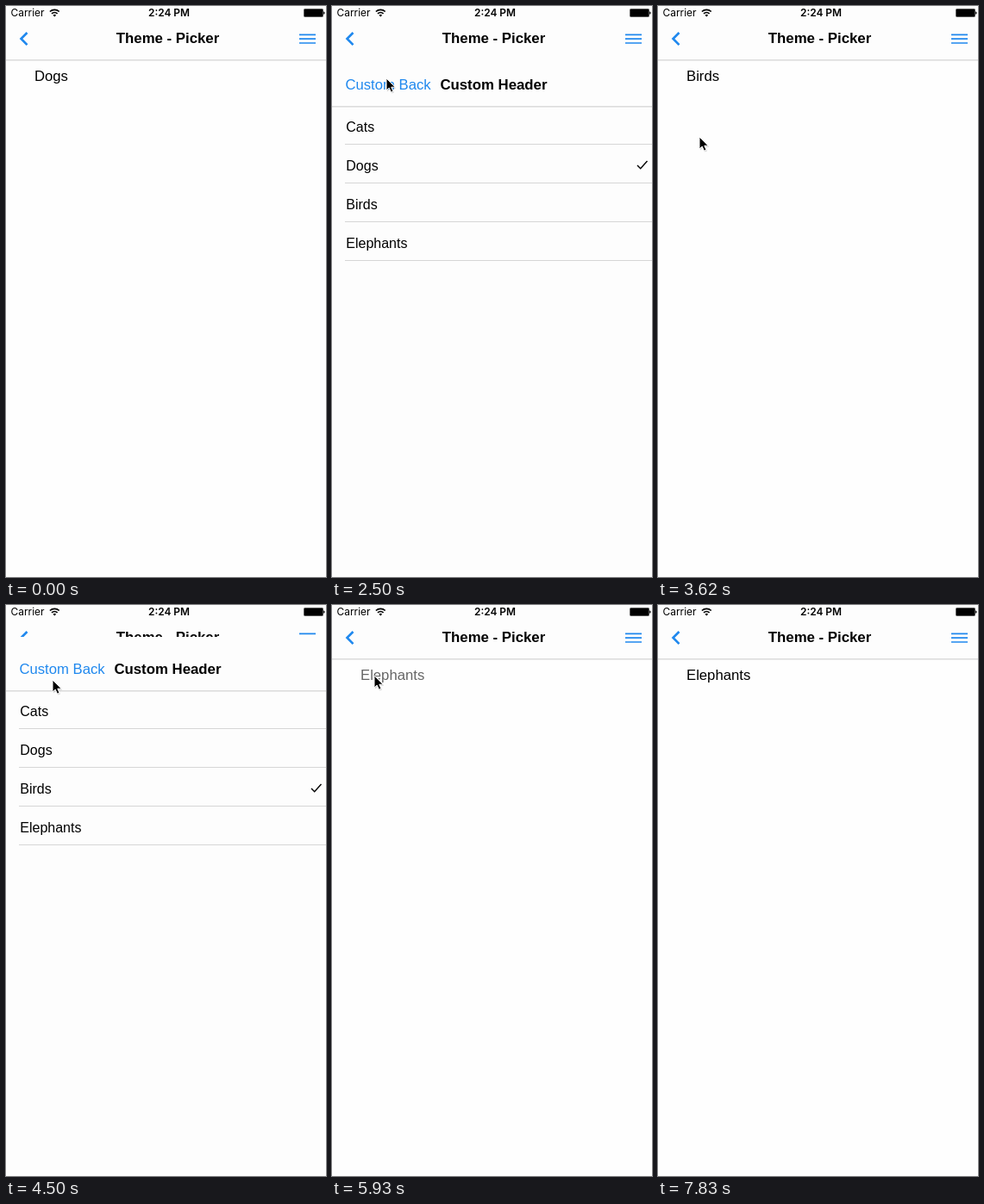
Animation, 371 px wide and 663 px high, one loop 8230 ms. Source, as an HTML page:

```html
<!DOCTYPE html>
<html lang="en">
<head>
<meta charset="utf-8">
<title>Theme picker</title>
<style>
  html, body { margin: 0; width: 100%; height: 100%; overflow: hidden; background: #fefefe; }
  svg { display: block; width: 371px; height: 663px; }
  text { font: 16px "Liberation Sans", Arial, sans-serif; }
  .big { font-size: 16.7px; }
  .title { font-size: 16.8px; font-weight: 700; }
  .status { font: 11.9px Inter, Roboto, sans-serif; }
  .clock { font-weight: 600; }
  .blue { stroke: #1f88ee; fill: none; }
</style>
</head>
<body>
<svg viewBox="0 0 371 663">
  <defs>
    <g id="bar">
      <rect width="371" height="62" fill="#fdfdfd"/>
      <rect y="62" width="371" height="1" fill="#dcdcdc"/>
      <rect y="63" width="371" height="1" fill="#eaeaea"/>
    </g>
  </defs>
  <rect width="371" height="663" fill="#fefefe"/>

  <use href="#bar"/>
  <path class="blue" stroke-width="2.6" d="M24.5 31 17.5 38 24.5 45.2"/>
  <text class="title" x="127.8" y="43">Theme - Picker</text>
  <path class="blue" stroke-width="1.7" d="M340 33.4h19M340 38.2h19M340 43h19"/>
  <text class="big" id="value" x="33" y="87"></text>

  <g id="modal">
    <rect width="371" height="663" fill="#fdfdfd"/>
    <use href="#bar"/>
    <text class="big" id="back" x="15.4" y="43" fill="#1f88ee">Custom Back</text>
    <text class="title" x="125.4" y="43">Custom Header</text>
    <g id="rows"></g>
    <path id="check" d="M354 131 357.7 134.7 365.5 126" fill="none" stroke="#000" stroke-width="1.4"/>
  </g>

  <text class="status" x="5.6" y="12.3">Carrier</text>
  <g fill="none" stroke="#000" stroke-width="1.7">
    <path d="M50.9 6.5a7.8 7.8 0 0 1 10.8 0M53 8.9a4.8 4.8 0 0 1 6.6 0"/>
    <path d="M56.3 12.6 54.5 10.7a2.6 2.6 0 0 1 3.6 0z" fill="#000" stroke="none"/>
  </g>
  <text class="status clock" x="165" y="12.3">2:24 PM</text>
  <rect x="345.5" y="3.5" width="22" height="9" rx="1" stroke="#555"/>
  <path d="M368.1 6.2q1.5.4 1.5 1.8t-1.5 1.8z"/>

  <g id="cursor">
    <path d="M1 1.5V15.5L4.2 12.6 6.5 17.5 9 16.4 6.8 11.8H11.3z" opacity=".15"/>
    <path d="M0 0V14L3.2 11.1 5.5 16.2 8 15.1 5.8 10.2H10.3z" stroke="#fff"/>
  </g>
</svg>
<script>
const LOOP = 8230, HEIGHT = 663, ROW = 45;
const pets = ["Cats", "Dogs", "Birds", "Elephants"];
const $ = id => document.getElementById(id);

$("rows").innerHTML = pets.map((name, i) =>
  `<text x="16.3" y="${91.5 + ROW * i}">${name}</text>
   <rect x="15" y="${106 + ROW * i}" width="356" height="1" fill="#d6d6d6"/>`).join("");

const clamp = v => Math.min(1, Math.max(0, v));
const smooth = k => k * k * (3 - 2 * k);

// CSS-style cubic bezier easing
function bezier(x1, y1, x2, y2) {
  const at = (a, b, s) => 3 * a * s * (1 - s) ** 2 + 3 * b * s * s * (1 - s) + s ** 3;
  return x => {
    let lo = 0, hi = 1;
    for (let i = 0; i < 24; i++) {
      const mid = (lo + hi) / 2;
      if (at(x1, x2, mid) < x) lo = mid; else hi = mid;
    }
    return at(y1, y2, lo);
  };
}
const slideIn = bezier(.36, .66, .04, 1), slideOut = bezier(0, 0, .58, 1);

const visits = [
  { open: 2322, close: 3170, pick: 2 },
  { open: 4296, close: 5110, pick: 3 },
  { open: 6045, close: 7055, pick: 3 }
];

// The pointer enters at the bottom, then glides to each stop and waits there
const entry = [213, 629];
const moves = [
  { from: 1340, to: 1980, x: 63, y: 84 },
  { from: 2600, to: 3080, x: 48, y: 170 },
  { from: 3480, to: 3950, x: 54, y: 87 },
  { from: 4540, to: 4930, x: 67, y: 218 },
  { from: 5380, to: 5720, x: 49, y: 82 },
  { from: 6420, to: 6690, x: 24, y: 40 },
  { from: 7120, to: 7830, x: 325, y: 664 }
];

function cursorAt(t) {
  let [x, y] = entry;
  for (const m of moves) {
    const k = smooth(clamp((t - m.from) / (m.to - m.from)));
    x += (m.x - x) * k * k; // sideways motion lags, bowing the path
    y += (m.y - y) * k;
  }
  return [Math.round(x), Math.round(y)];
}

function draw(t) {
  let top = HEIGHT, picked = 1, pressed = false;
  for (const { open, close, pick } of visits) {
    if (t >= open) {
      top = HEIGHT * (t < close ? 1 - slideIn(clamp((t - open) / 400))
                                : slideOut(clamp((t - close) / 250)));
    }
    if (t >= close - 20) picked = pick;
    pressed ||= t >= open - 160 && t < open + 40;
  }
  $("modal").setAttribute("transform", `translate(0 ${Math.round(top)})`);
  $("check").setAttribute("transform", `translate(0 ${(picked - 1) * ROW})`);
  $("value").textContent = pets[picked];
  $("value").style.opacity = pressed && t > 2300 ? .6 : 1;
  $("back").style.opacity = t >= 7010 ? .85 : 1;
  $("cursor").style.display = t >= moves[0].from && t < moves.at(-1).to ? "" : "none";
  $("cursor").setAttribute("transform", `translate(${cursorAt(t)})`);
}

const start = performance.now();
function tick() {
  draw((performance.now() - start) % LOOP);
  requestAnimationFrame(tick);
}
tick();
</script>
</body>
</html>
```
